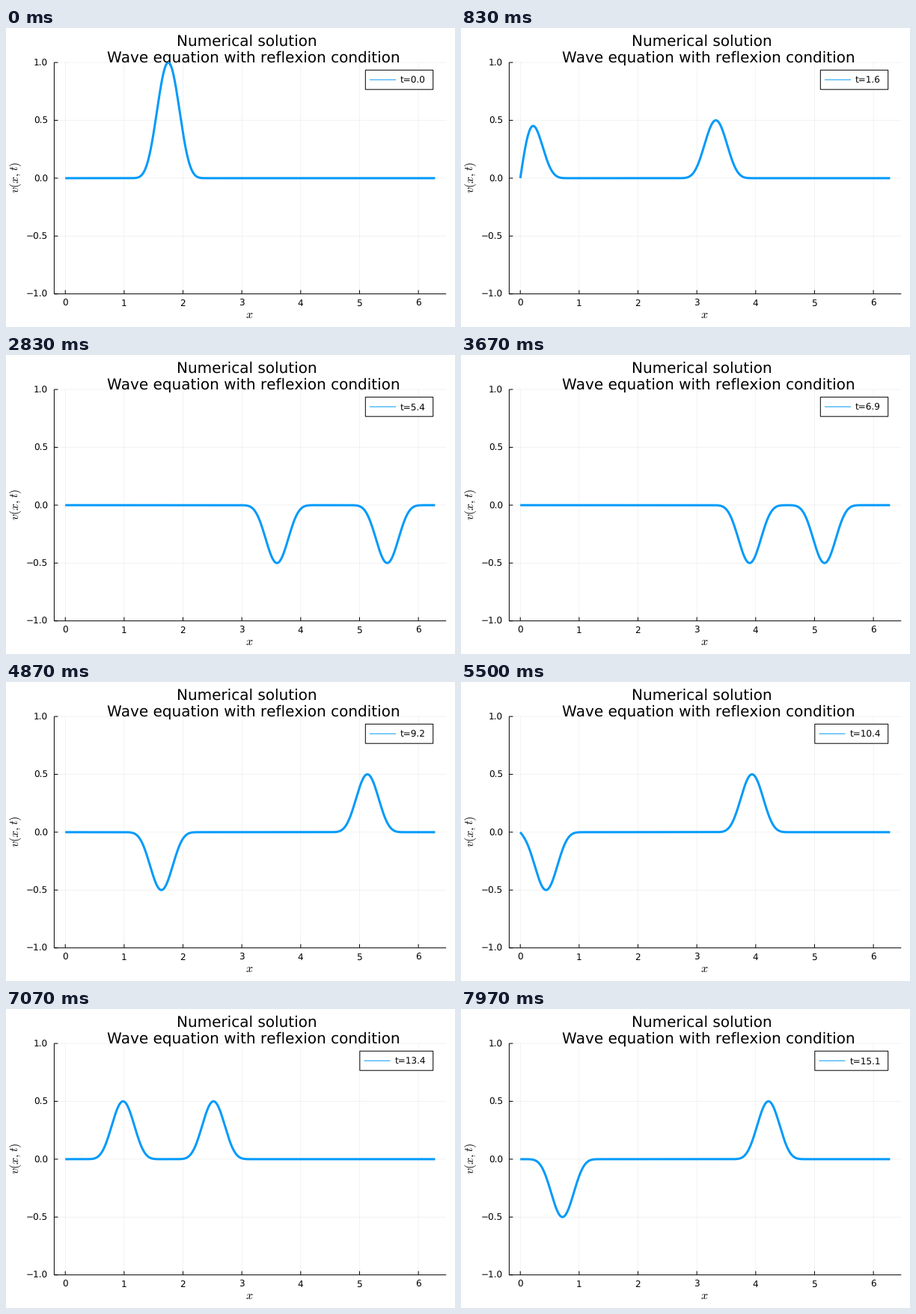
Recreate the animation shown at these times as a matplotlib script. Size 600 by 400 pixels, loop 8 s.

```python
import numpy as np
import matplotlib.pyplot as plt
from matplotlib.animation import FuncAnimation
from matplotlib.patches import Rectangle

W, H, DPI = 600, 400, 100
PT = 72 / DPI                      # one pixel in points

STEPS, LOOP_MS = 240, 8000
TICKS = 2                          # drawn frames per wave step

LENGTH = 2 * np.pi
CENTER, REACH, POWER = 1.75, 0.75, 8
CLOCK_STEP = 6 * np.pi / 299       # time shown per step
WAVE_STEP = 0.0629                 # distance travelled per step

LEFT, RIGHT, TOP, BOTTOM = 64.4, 588.2, 46.1, 355.7
BLUE = (0.0, 0.6056, 0.9787)
TITLE, SMALL, MATH = 20.3, 11.6, 15.95

plt.rcParams.update({
    "font.family": "DejaVu Sans",
    "mathtext.fontset": "cm",
    "text.hinting": "none",
    "text.hinting_factor": 1,
    "path.snap": False,
})

fig = plt.figure(figsize=(W / DPI, H / DPI), dpi=DPI, facecolor="white")
ax = fig.add_axes([0, 0, 1, 1])
ax.set_xlim(0, W)
ax.set_ylim(H, 0)
ax.axis("off")


def px(x):
    pad = 0.03 * LENGTH
    return LEFT + (x + pad) * (RIGHT - LEFT) / (LENGTH + 2 * pad)


def py(v):
    return (TOP + BOTTOM) / 2 - v * (BOTTOM - TOP) / 2


def line(xs, ys, width=1.0, color="black", **kw):
    return ax.plot(xs, ys, color=color, lw=width * PT, solid_capstyle="butt", **kw)[0]


def label(x, y, s, size, ha="center", va="baseline", **kw):
    return ax.text(x, y, s, fontsize=size * PT, ha=ha, va=va, **kw)


def pulse(s):
    """Smooth bump repeated as an odd function of period 2 * LENGTH."""
    def bump(d):
        d = (d + LENGTH) % (2 * LENGTH) - LENGTH
        return np.clip(1 - (d / REACH) ** 2, 0, 1) ** POWER
    return bump(s - CENTER) - bump(s + CENTER)


def wave(x, shift):
    return 0.5 * (pulse(x - shift) + pulse(x + shift))


label(322, 24, "Numerical solution", TITLE, zorder=1)
label(330.3, 46.3, "Wave equation with reflexion condition", TITLE, zorder=1)

for n in range(7):
    x = px(n)
    line([x, x], [TOP, BOTTOM], 0.5, alpha=0.1, zorder=2)
    line([x, x], [BOTTOM, BOTTOM - 5], zorder=3)
    label(x - 0.3, 371.5, str(n), SMALL)

for v in (-1.0, -0.5, 0.0, 0.5, 1.0):
    y = py(v)
    line([LEFT, RIGHT], [y, y], 0.5, alpha=0.1, zorder=2)
    line([LEFT, LEFT + 5], [y, y], zorder=3)
    label(56, y + 4.5, f"{v:.1f}".replace("-", "\u2212"), SMALL, ha="right")

line([LEFT, LEFT, RIGHT], [TOP, BOTTOM, BOTTOM], zorder=3, solid_joinstyle="miter")
label(325.5, 388, "$x$", MATH)
label(13.3, py(0) - 0.8, "$v(x,t)$", MATH, va="center", rotation=90)

grid = np.linspace(0, LENGTH, 600)
curve = line(px(grid), py(wave(grid, 0)), 3, BLUE, zorder=4, solid_joinstyle="round")
curve.set_clip_path(Rectangle((LEFT, TOP), RIGHT - LEFT, BOTTOM - TOP,
                              transform=ax.transData))

box = Rectangle((480.3, 56.3), 90.4, 25.9, fc="white", ec="black", lw=PT, zorder=5)
ax.add_patch(box)
sample = line([486, 521], [69.2, 69.2], 1, BLUE, zorder=6)
clock = label(526.7, 73.6, "t=0.0", SMALL, ha="left", zorder=6)


def draw(i):
    step = (i + 1) // TICKS        # nearest step to the current time
    curve.set_ydata(py(wave(grid, step * WAVE_STEP)))
    text = f"t={step * CLOCK_STEP:.1f}"
    extra = 7.5 if len(text) > 5 else 0
    box.set_x(480.3 - extra)
    box.set_width(90.4 + extra)
    sample.set_xdata([486 - extra, 521 - extra])
    clock.set_x(526.7 - extra)
    clock.set_text(text)
    return curve, box, sample, clock


frames = STEPS * TICKS
anim = FuncAnimation(fig, draw, frames=frames, interval=LOOP_MS / frames,
                     repeat=True, repeat_delay=0, blit=False)
plt.show()
```
